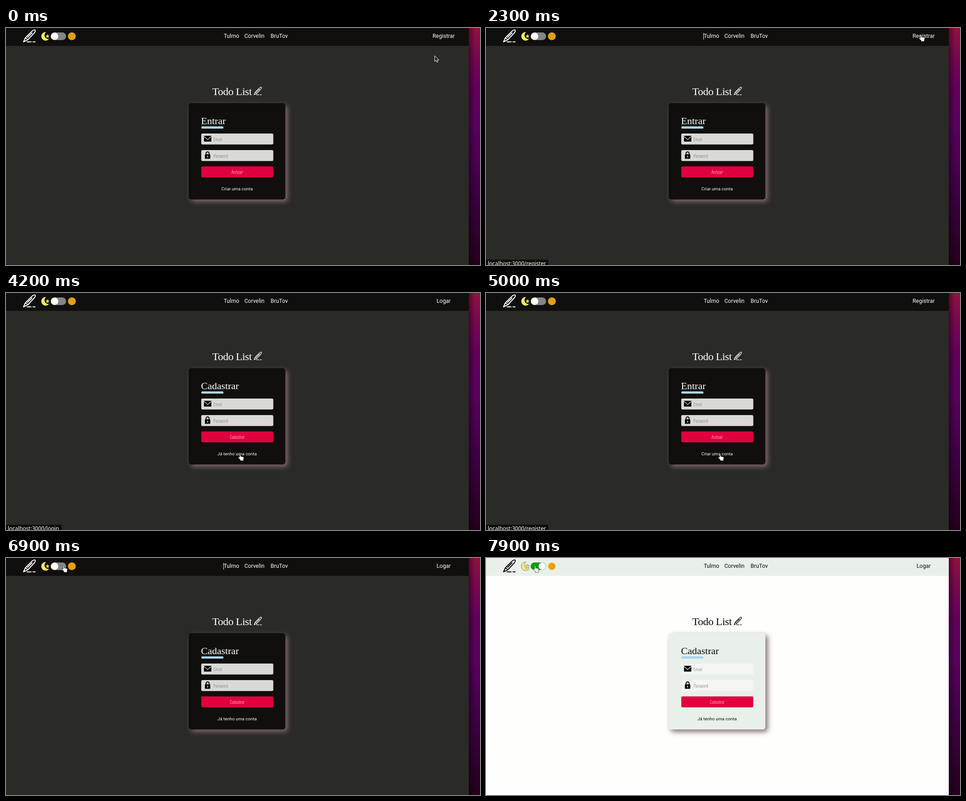
An HTML page that plays this animation: 1056 by 530 pixels, repeating every 8000 ms.

```html
<!DOCTYPE html>
<html lang="pt-BR">
<head>
<meta charset="utf-8">
<title>Todo List</title>
<style>
html, body { margin: 0; width: 100%; height: 100%; overflow: hidden; background: #2a2a26; }
svg { display: block; }
#app { --bg: #2a2a26; --panel: #100f0d; --ink: #fff; --field: #d9dad6; --moon: #f3e95c; --edge: none; }
#app.light { --bg: #fefefd; --panel: #e9f0ea; --ink: #0b0b0b; --field: #f5f5f3; --moon: #f2e77a; --edge: #77715c; }
.bg { fill: var(--bg); }
.panel { fill: var(--panel); }
.card { filter: drop-shadow(5px 5px 6px #80696f); }
.field { fill: var(--field); }
.ink { fill: var(--ink); }
.pen { fill: none; stroke: var(--ink); stroke-width: 2; stroke-linejoin: round; stroke-linecap: round; }
.nav { font: 12.4px Roboto, sans-serif; }
.link { font: 9.9px Roboto, sans-serif; }
.mid { text-anchor: middle; }
.title { font: 24px "Liberation Serif", serif; letter-spacing: -.5px; }
.head { font: 22px "Liberation Serif", serif; }
.small { font: 300 10.5px "Open Sans", sans-serif; font-stretch: 75%; fill: #6f6f6d; }
.small.mid { fill: #fff; }
.tip { font: 12px "Noto Sans", sans-serif; fill: #fff; }
</style>
</head>
<body>
<svg id="app" width="1056" height="530" viewBox="0 0 1056 530">
  <defs>
    <linearGradient id="desk" x2="0" y2="1">
      <stop offset="0" stop-color="#901142"/>
      <stop offset=".12" stop-color="#76084f"/>
      <stop offset=".25" stop-color="#640059"/>
      <stop offset=".42" stop-color="#59005f"/>
      <stop offset=".7" stop-color="#3d0042"/>
      <stop offset="1" stop-color="#24001d"/>
    </linearGradient>
    <linearGradient id="shade">
      <stop offset="0" stop-color="#000" stop-opacity=".4"/>
      <stop offset="1" stop-color="#000" stop-opacity="0"/>
    </linearGradient>
    <g id="pen">
      <path d="M1 27 5 18 20 3Q25-1 27 1 28 3 25 7L11 22ZM5 18 11 22M10 17 20 7M9 27H18M22 27H27"/>
    </g>
  </defs>

  <rect class="bg" width="1031" height="530"/>
  <rect class="panel" width="1031" height="40"/>
  <rect x="1031" width="25" height="530" fill="url(#desk)"/>
  <rect x="1031" width="14" height="530" fill="url(#shade)"/>

  <use href="#pen" class="pen" x="38" y="4"/>
  <g stroke="var(--edge)" stroke-width=".8">
    <path fill="var(--moon)" d="M89.5 9A9.7 9.7 0 1 0 96 24.5 8.6 8.6 0 0 1 89.5 9Z"/>
    <path fill="var(--moon)" d="M92.5 13.5 93.7 16.8 97 17 94.4 19 95.3 22.4 92.5 20.4 89.7 22.4 90.6 19 88 17 91.3 16.8Z"/>
  </g>
  <g id="sun" fill="#f0c21f"></g>
  <circle cx="146.7" cy="18.5" r="6.6" fill="#eb9d0d" stroke="#c98a10" stroke-width=".6"/>
  <rect id="track" x="99.5" y="10" width="34.5" height="17" rx="8.5"/>
  <circle id="knob" cy="18.5" r="8.2" fill="#fff"/>

  <g class="nav ink">
    <text x="485" y="22.4">Tulmo</text>
    <text x="531" y="22.4">Corvelin</text>
    <text x="589.5" y="22.4">BruTov</text>
    <text id="other" class="mid" x="975" y="22.4"></text>
  </g>
  <rect id="caret" class="ink" x="484.3" y="11" width="1" height="15"/>

  <text class="title ink" x="459.5" y="150">Todo List</text>
  <use href="#pen" class="pen" transform="translate(552 132) scale(.64)"/>

  <rect class="panel card" x="407" y="168" width="215.5" height="215.5" rx="6"/>
  <text id="head" class="head ink" x="434.5" y="215"></text>
  <rect x="435" y="220" width="49.5" height="5" rx="2.5" fill="#a6d6f2"/>
  <rect class="field" x="435" y="236" width="160.5" height="24.5" rx="3"/>
  <rect class="field" x="435" y="273" width="160.5" height="24.5" rx="3"/>
  <rect x="435" y="309.5" width="160.5" height="24.5" rx="3" fill="#e0003f"/>

  <rect x="441" y="241" width="16.5" height="13" rx="1"/>
  <path d="M441 242.5 449.2 249.5 457.5 242.5" fill="none" stroke="var(--field)" stroke-width="1.3"/>
  <rect x="443" y="282.5" width="12.2" height="10" rx="1.5"/>
  <path d="M445.6 283V280.5a3.5 3.5 0 0 1 7 0V283" fill="none" stroke="#000" stroke-width="2"/>
  <path d="M449.1 285.5a1.3 1.3 0 0 1 .6 2.4V290h-1.2V287.9a1.3 1.3 0 0 1 .6-2.4Z" fill="var(--field)"/>

  <text class="small" x="462.5" y="253">Email</text>
  <text class="small" x="462.5" y="290">Password</text>
  <text id="send" class="small mid" x="515" y="325.5"></text>
  <text id="swap" class="link mid ink" x="514.8" y="363.2"></text>

  <g id="status">
    <path id="tab" fill="#0d0d0d"/>
    <text id="url" class="tip" x="4" y="531.3"></text>
  </g>

  <path id="arrow" fill="#222" stroke="#fff" d="M0 0V13L3 10.2 5.2 15 7.4 14 5.2 9.4H9.6Z"/>
  <path id="hand" fill="#fff" stroke="#222" stroke-width=".8" d="M3.2 1.6C3.2-.4 5.6-.4 5.6 1.6V5.2L11 6.3C12.6 6.7 13 7.6 12.8 9L12 12V15H5V13L.6 8.9C-.4 7.6 1.2 6.4 2.2 7.4L3.2 8.3Z"/>
</svg>

<script>
const LOOP = 8000, STEP = 100;
const $ = id => document.getElementById(id);
const within = (t, spans) => spans.some(([a, b]) => t >= a && t < b);
const setText = (id, s) => { if ($(id).textContent !== s) $(id).textContent = s; };
const show = (id, on) => $(id).setAttribute('visibility', on ? 'visible' : 'hidden');

const pages = {
  login: { other: 'Registrar', head: 'Entrar', send: 'Acessar', swap: 'Criar uma conta' },
  register: { other: 'Logar', head: 'Cadastrar', send: 'Cadastrar', swap: 'Já tenho uma conta' }
};

// Pointer path: time, x, y
const path = [
  [0, 955, 62], [100, 965, 73], [200, 972, 71], [300, 971, 44], [400, 966, 16],
  [600, 966, 16], [700, 964.5, 15], [2500, 964.5, 15], [2800, 790, 150], [3100, 570, 325],
  [3500, 517, 360], [5600, 517, 360], [5700, 350, 245], [5800, 190, 125], [5900, 190, 125],
  [6000, 102, 9.5], [6200, 102, 12], [6400, 100, 14], [6900, 124, 17], [7400, 124, 17], [7900, 105, 17]
];
const caretOn = [[600, 1200], [1800, 2100], [2300, 2900], [3500, 4200], [4400, 5000], [5500, 6000], [6600, 7100]];
const handOn = [[400, 2600], [3300, 5700], [6000, LOOP]];
const statusOn = [[600, 2600], [3300, 6100]];
const registerOn = [[2400, 4300], [5400, LOOP]];

function pointer(t) {
  const i = path.findIndex(p => p[0] > t);
  if (i < 0) return path[path.length - 1].slice(1);
  const [a, b] = [path[i - 1], path[i]], k = (t - a[0]) / (b[0] - a[0]);
  return [a[1] + (b[1] - a[1]) * k, a[2] + (b[2] - a[2]) * k];
}

function drawSun() {
  let rays = '';
  for (let i = 0; i < 16; i++)
    rays += `<path d="M-2.4-6 0-9.6 2.4-6Z" transform="translate(146.7 18.5) rotate(${i * 22.5})"/>`;
  $('sun').innerHTML = rays;
}

function draw(t) {
  const page = within(t, registerOn) ? 'register' : 'login';
  for (const id in pages[page]) setText(id, pages[page][id]);

  // The status bar points at the opposite page
  const goal = page === 'login' ? 'register' : 'login';
  setText('url', 'localhost:3000/' + goal);
  $('tab').setAttribute('d', `M0 518H${goal === 'login' ? 120 : 135}q4 0 4 4V530H0Z`);
  show('status', within(t, statusOn));
  show('caret', within(t, caretOn));

  $('app').setAttribute('class', t >= 7100 ? 'light' : '');
  const on = Math.min(1, Math.max(0, (t - 7100) / 200));
  $('knob').setAttribute('cx', 108.3 + 17 * on);
  $('track').setAttribute('fill', `color-mix(in srgb, #0aa00a ${on * 100}%, #848484)`);
  $('track').style.fill = `color-mix(in srgb, #0aa00a ${on * 100}%, #848484)`;

  const hand = within(t, handOn), at = `translate(${pointer(t)})`;
  show('hand', hand);
  show('arrow', !hand);
  $('hand').setAttribute('transform', at);
  $('arrow').setAttribute('transform', at);
}

function tick(now) {
  draw(Math.floor((now - start) % LOOP / STEP) * STEP);
  requestAnimationFrame(tick);
}

drawSun();
draw(0);
let start = performance.now();
requestAnimationFrame(now => { start = now; tick(now); });
</script>
</body>
</html>
```
